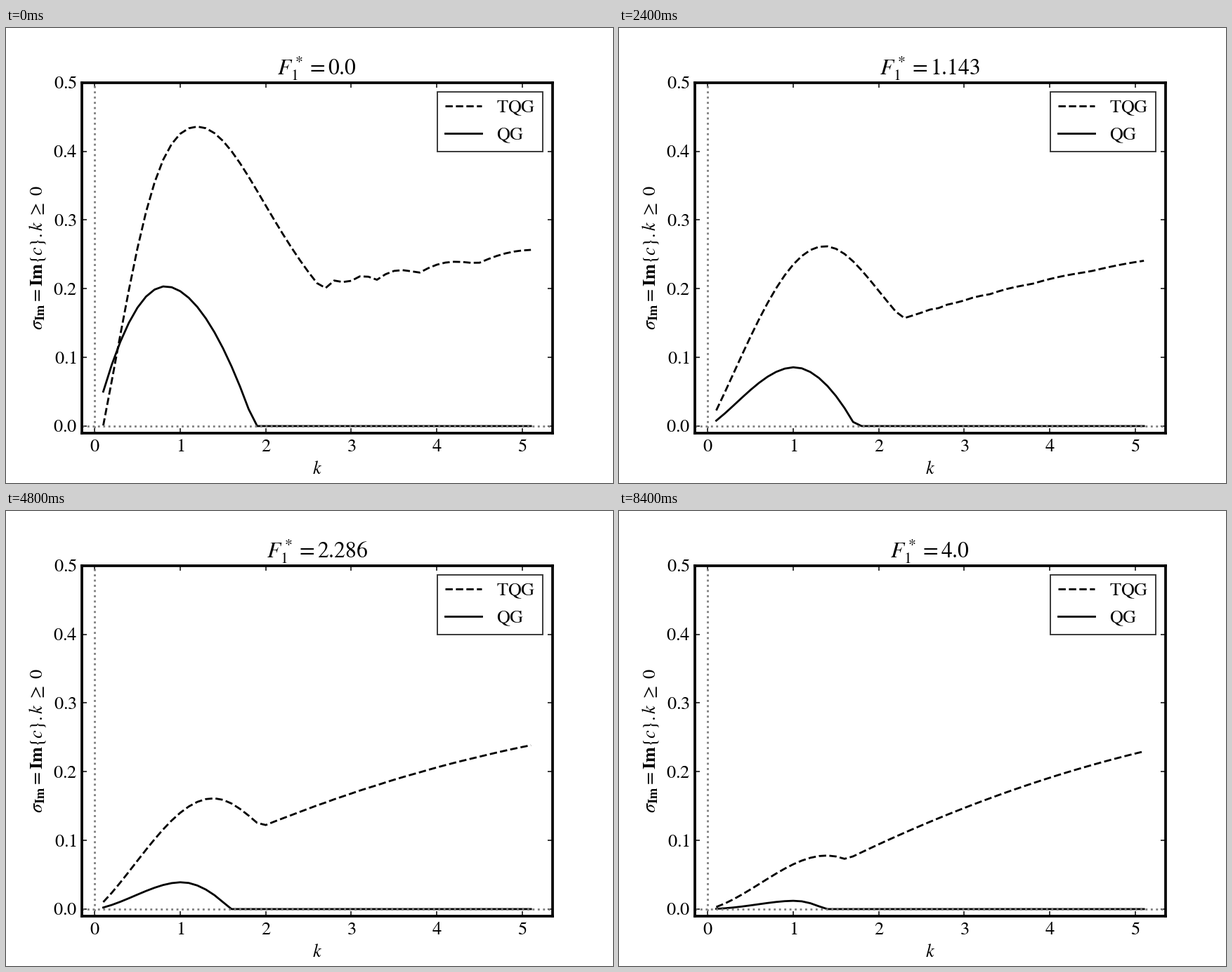
Animation, 864 px wide and 648 px high, one loop 9 s. Source, as a matplotlib script:

```python
import numpy as np
import matplotlib.pyplot as plt
from matplotlib.animation import FuncAnimation

plt.rcParams.update({
    "font.family": "Liberation Serif",
    "font.size": 14,
    "mathtext.fontset": "stix",
})

STEPS = 15
K = np.linspace(0.1, 5.1, 51)


def early(f):
    """Weight of the corrections that matter only close to F = 0."""
    return np.exp(-4 * f)


def rise(u, power):
    """Quarter sine climbing from 0 to 1 while u goes from 0 to 1."""
    return np.clip(u, 0, 1) ** power


def tqg(f):
    w = early(f)
    height = 0.425 * np.exp(-0.424 * f) + 0.011 * w
    peak = 1.39 - 0.19 * np.exp(-1.8 * f)

    # Low-k mode: sine climb to the peak, Lorentzian fall behind it.
    u = np.clip(K / peak, 0, 1)
    phase = rise(u, 0.98 + 0.105 * f) - 0.09 * w * np.cos(np.pi * u) * (1 - u * u)
    fall = 1 + (0.56 + 0.23 * f) * np.maximum(K - peak, 0) ** 2
    hump = height * np.sin(np.pi / 2 * np.maximum(phase, 0)) / fall

    # High-k modes: a parabola around k = 3 with scallops that widen with k.
    d = K - 3
    slope = 0.02 + 0.0341 * (1 - np.exp(-0.45 * f))
    bend = 0.0045 * (1 - np.exp(-f))
    scallop = np.log(np.maximum(K - 2.075, 0.01) / 0.625) / np.log(1.4)
    ripple = 0.009 * np.exp(-1.6 * f) * np.abs(np.sin(np.pi * scallop))
    tail = 0.196 - 0.0122 * f + 0.011 * w + slope * d - bend * d * d + ripple

    return np.where(K > peak, np.maximum(hump, tail), hump)


def qg(f):
    w = early(f)
    height = 0.187 * np.exp(-0.685 * f) + 0.0165 * w
    peak = 1.02 - 0.19 * w
    cutoff = 1.87 - 0.125 * f
    climb = np.sin(np.pi / 2 * rise(K / peak, 1.02 + 0.175 * f - 0.15 * w))
    drop = np.clip((K - peak) / (cutoff - peak), 0, 1) ** 1.85
    return height * climb * (1 - drop)


fig, ax = plt.subplots(figsize=(6.4, 4.8), dpi=135)
fig.subplots_adjust(left=0.125, right=0.9, bottom=0.11, top=0.88)

tqg_line, = ax.plot(K, tqg(0), "k--", lw=1.5, label=r"$\mathrm{TQG}$")
qg_line, = ax.plot(K, qg(0), "k-", lw=1.5, label=r"$\mathrm{QG}$")
ax.axhline(0, color="gray", ls=":", lw=1.5)
ax.axvline(0, color="gray", ls=":", lw=1.5)

ax.set_xlim(-0.15, 5.35)
ax.set_ylim(-0.01, 0.5)
ax.set_xticks(range(6), [f"${n}$" for n in range(6)])
ax.set_yticks(np.arange(6) / 10, [f"$0.{n}$" for n in range(6)])
ax.tick_params(direction="in", top=True, right=True)
ax.tick_params(axis="x", pad=5.2)
ax.spines[:].set_linewidth(2)
ax.set_xlabel("$k$", labelpad=4.5)
ax.set_ylabel(r"$\sigma_{\mathbf{Im}} = \mathbf{Im}\{c\}.k$ $\geq$ $0$", labelpad=4.5)
ax.legend(loc="upper right", fancybox=False, edgecolor="k")
title = ax.set_title("")


def update(i):
    f = 4 * i / (STEPS - 1)
    tqg_line.set_ydata(tqg(f))
    qg_line.set_ydata(qg(f))
    title.set_text(f"$F_1^* = {round(f, 3)}$")
    return tqg_line, qg_line, title


anim = FuncAnimation(fig, update, frames=STEPS, interval=600, repeat=True, repeat_delay=0)
plt.show()
```
